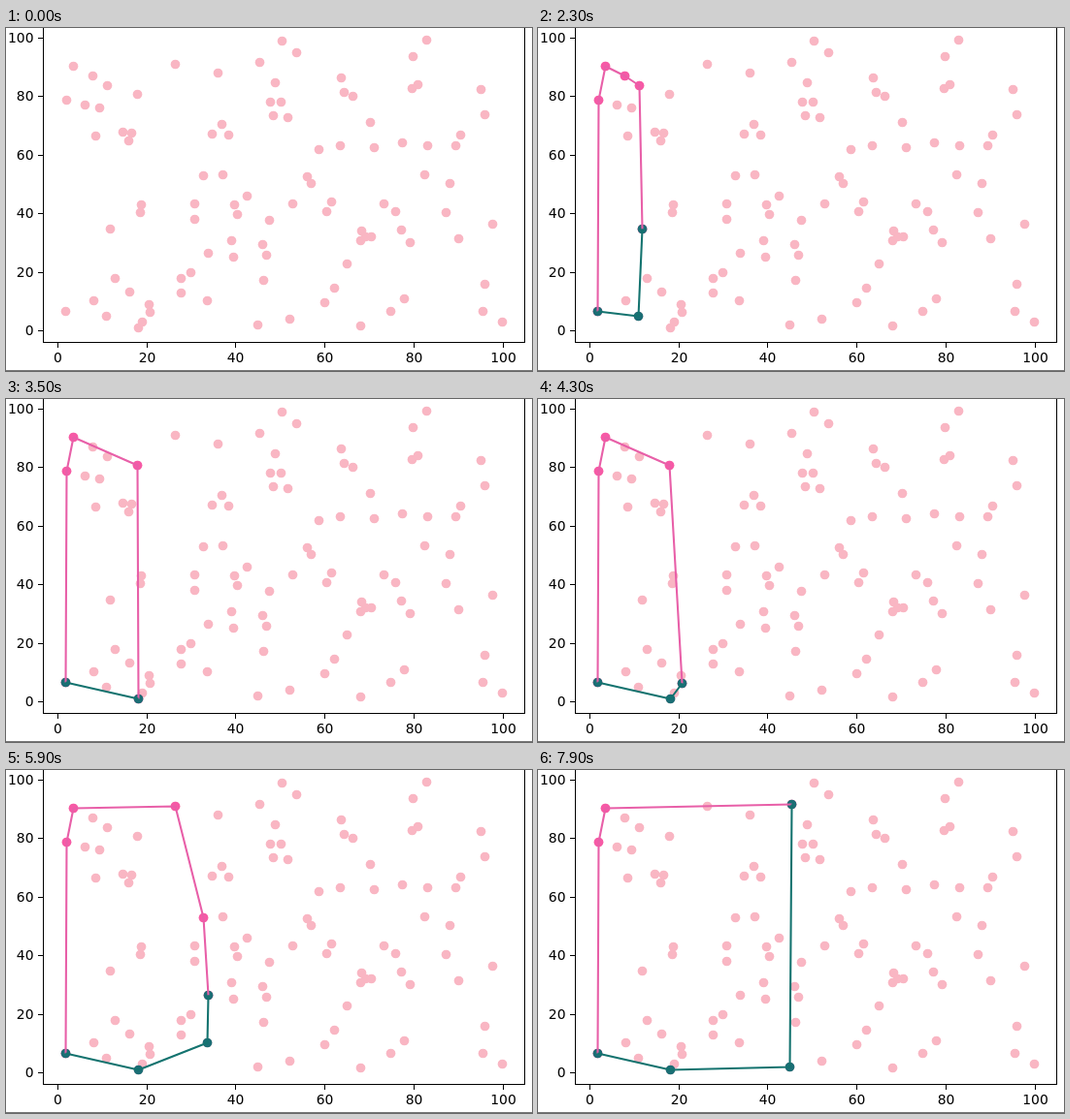
These frames come from a looping animation (542x354 px, 8 s). An HTML page with a canvas:

```html
<!DOCTYPE html>
<html lang="en">
<head>
<meta charset="utf-8">
<title>Convex hull sweep</title>
<style>
  html, body { margin: 0; width: 100%; height: 100%; overflow: hidden; background: #fff; }
  canvas { display: block; }
</style>
</head>
<body>
<canvas id="stage" width="542" height="354"></canvas>
<script>
const ctx = document.getElementById('stage').getContext('2d');

const LOOP = 8000, TICK = 100;             // picture refreshes ten times a second
const SWEEP_START = 562, POINT_TIME = 167; // one more point joins the hull each step

const LIGHT = '#f9b6c3';
const UPPER = { side: 1, dot: '#f65aa6', line: '#e85fa8' };
const LOWER = { side: -1, dot: '#1b6e75', line: '#14736f' };

// Points the sweep reaches, from left to right
const swept = [
  [61, 292], [62, 74], [69, 39], [81, 79], [89, 49], [90, 281], [92, 111], [96, 82],
  [103, 297], [104, 59], [107, 207], [112, 258], [120, 107], [126, 116], [127, 272],
  [129, 108], [135, 68], [136, 309], [138, 190], [139, 182], [140, 303], [147, 285],
  [148, 293], [174, 37], [180, 258], [180, 273], [190, 252], [194, 181], [194, 197],
  [203, 152], [207, 281], [208, 232], [212, 109], [218, 46], [222, 99], [223, 151],
  [229, 110], [232, 219], [234, 236], [235, 182], [238, 192], [248, 173], [259, 306],
  [261, 35]
];

// Points still ahead of the sweep when the loop ends
const ahead = [
  [264, 223], [265, 260], [268, 234], [271, 198], [272, 76], [275, 90], [277, 56],
  [283, 76], [284, 13], [290, 92], [292, 300], [295, 181], [299, 25], [310, 153],
  [314, 160], [322, 125], [328, 283], [330, 189], [335, 179], [338, 268], [344, 121],
  [345, 51], [348, 66], [351, 243], [357, 70], [365, 307], [365, 219], [366, 209],
  [370, 215], [376, 215], [375, 97], [379, 123], [389, 181], [396, 292], [401, 189],
  [407, 208], [408, 118], [410, 279], [416, 221], [418, 62], [419, 29], [424, 58],
  [431, 151], [433, 12], [434, 121], [453, 190], [457, 160], [463, 121], [466, 217],
  [468, 110], [489, 63], [493, 89], [491, 292], [493, 264], [501, 202], [511, 303]
];

const cross = (a, b, c) =>
  (b[0] - a[0]) * (c[1] - b[1]) - (b[1] - a[1]) * (c[0] - b[0]);

// Monotone chain: drop points that no longer bulge outwards
function chain(points, side) {
  const hull = [];
  for (const p of points) {
    while (hull.length > 1 && cross(hull.at(-2), hull.at(-1), p) * side <= 0) hull.pop();
    hull.push(p);
  }
  return hull;
}

function drawDots(points, color) {
  ctx.fillStyle = color;
  for (const [x, y] of points) {
    ctx.beginPath();
    ctx.arc(x + 0.5, y + 0.5, 4.85, 0, 2 * Math.PI);
    ctx.fill();
  }
}

function drawPath(points, color) {
  ctx.strokeStyle = color;
  ctx.lineWidth = 2.08;
  ctx.lineJoin = 'round';
  ctx.beginPath();
  for (const [x, y] of points) ctx.lineTo(x + 0.5, y + 0.5);
  ctx.stroke();
}

function drawAxes() {
  ctx.fillStyle = '#777';
  ctx.fillRect(0, 353, 542, 1);

  ctx.fillStyle = '#000';
  ctx.fillRect(38, 0, 1, 325);
  ctx.fillRect(534, 0, 1, 325);
  ctx.fillRect(38, 324, 497, 1);

  ctx.font = '13.89px "DejaVu Sans", sans-serif';
  for (let value = 0; value <= 100; value += 20) {
    const x = Math.round(53 + 4.585 * value);
    const y = Math.round(312 - 3.02 * value);
    ctx.fillRect(x, 325, 1, 5);
    ctx.fillRect(33, y, 5, 1);
    ctx.textAlign = 'center';
    ctx.fillText(value, x + 0.5, 345);
    ctx.textAlign = 'right';
    ctx.fillText(value, 28.5, y + 5);
  }
}

function draw() {
  const time = Math.floor(performance.now() % LOOP / TICK) * TICK;
  const last = Math.floor((time - SWEEP_START) / POINT_TIME);

  ctx.fillStyle = '#fff';
  ctx.fillRect(0, 0, 542, 354);
  drawDots(swept, LIGHT);
  drawDots(ahead, LIGHT);

  if (last > 0) {
    const reached = swept.slice(0, last + 1);
    const hulls = [UPPER, LOWER].map(h => ({ ...h, points: chain(reached, h.side) }));
    for (const h of hulls) drawDots(h.points, h.dot);
    for (const h of hulls) drawPath(h.points, h.line);
  }

  drawAxes();
  requestAnimationFrame(draw);
}

draw();
</script>
</body>
</html>
```
